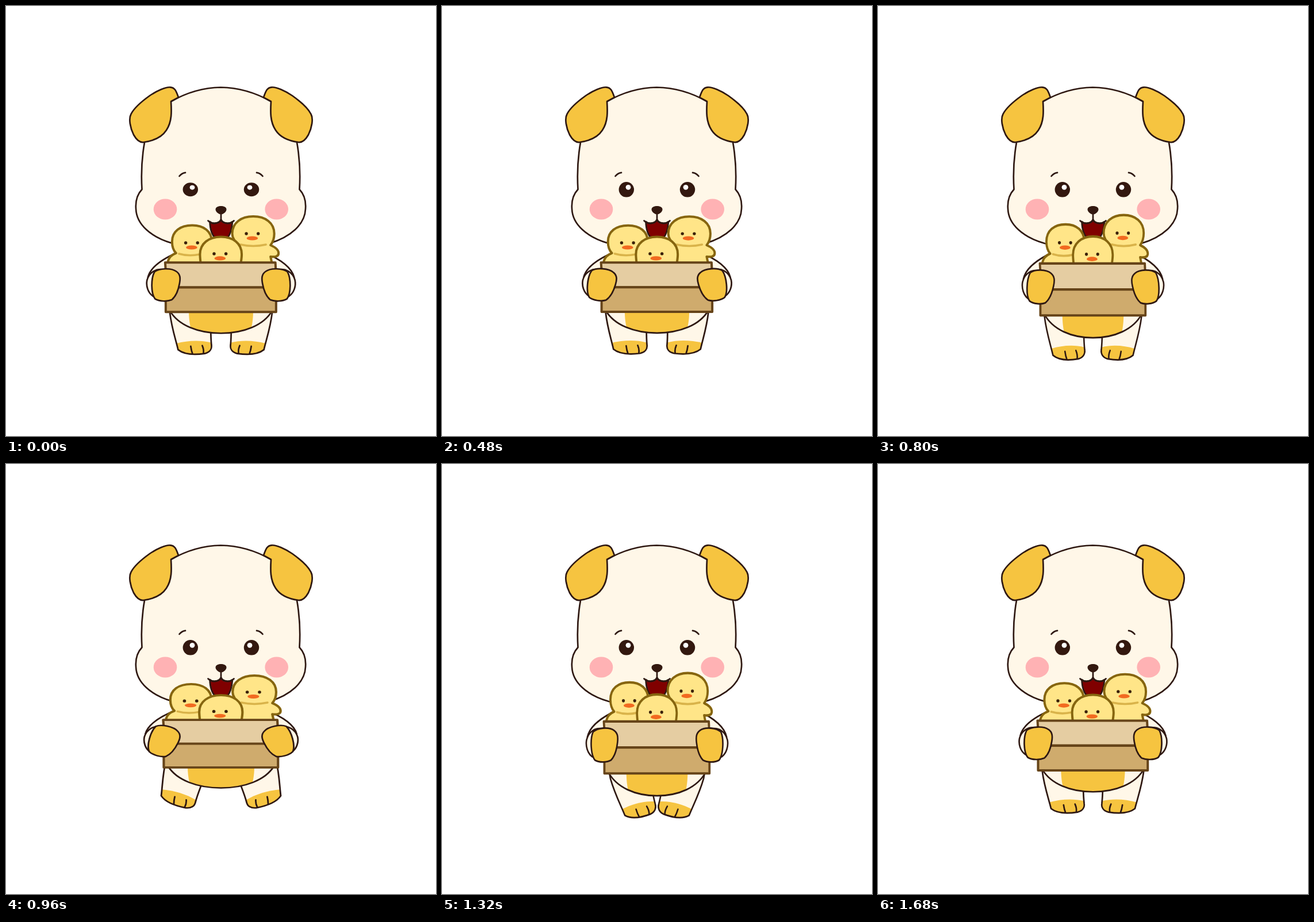
Animation of 748 by 748 pixels, one loop 2 s. Source, as an HTML page:

```html
<!DOCTYPE html>
<html lang="en">
<head>
<meta charset="utf-8">
<title>Puppy with chicks</title>
<style>
  html, body { margin: 0; width: 100%; height: 100%; overflow: hidden; background: #fff; }
  svg { display: block; width: 100%; height: 100%; }
  .line { stroke: #2e1812; stroke-width: 2.7; stroke-linecap: round; stroke-linejoin: round; }
  .cream { fill: #fff7e8; }
  .gold { fill: #f6c440; }
  .none { fill: none; }
  .chick { fill: #ffe588; stroke: #86650f; stroke-width: 4; stroke-linejoin: round; }
  .fold { fill: none; stroke: #d9b34a; stroke-width: 3.6; stroke-linecap: round; }
  .dot { fill: #3a2008; }
  .beak { fill: #f26a20; }
  .crate { stroke: #664419; stroke-width: 4; stroke-linejoin: round; }
  .dark { fill: #33180f; }
  .blush { fill: #ffb2b4; }
</style>
</head>
<body>
<svg viewBox="0 0 748 748">
  <defs>
    <g id="face">
      <circle class="dot" r="2.7" cx="-10.3"/>
      <circle class="dot" r="2.7" cx="10.3"/>
      <ellipse class="beak" rx="9.8" ry="3.6" cy="8"/>
    </g>
  </defs>

  <g class="squash">
    <g id="leg">
      <g id="swing">
        <path class="cream" d="M285 515V533C288 560 295 580 299 598C310 607 330 607 345 605C354 603 358 597 357 590C356 580 356 570 356 560V515Z"/>
        <path class="gold" d="M296 587C315 582 338 581 356.5 586C358 597 354 603 345 605C330 607 310 607 299 598Z"/>
        <path class="line none" d="M285 515V533C288 560 295 580 299 598C310 607 330 607 345 605C354 603 358 597 357 590C356 580 356 570 356 560V515M321 592Q322 600 324 605M341 591Q344 598 343 604"/>
      </g>
    </g>
    <use href="#leg" transform="matrix(-1 0 0 1 748 0)"/>
    <path class="cream" d="M290 425H458V460H290Z"/>
    <path class="cream" d="M290 455L285 530C300 556 335 569.5 374 569.5S448 556 463 530L458 455Z"/>
    <path class="gold" d="M318 525C318 540 319 550 321 559C338 566 356 569.5 374 569.5S410 566 427 559C429 550 430 540 430 525Z"/>
    <path class="line none" d="M290 455L285 530C300 556 335 569.5 374 569.5S448 556 463 530L458 455"/>
    <g id="arm">
      <path class="line cream" d="M300 428C272 440 251 455 247 472L256 500H300Z"/>
      <path class="line cream" d="M300 505H256C247 499 243.500 487 245.500 477C249 464 262 454 278 460"/>
    </g>
    <use href="#arm" transform="matrix(-1 0 0 1 748 0)"/>
  </g>

  <path class="line cream" d="M373.5 141.5C340 142 310 153 287 166C262 185 248 210 241 237C236 265 235 295 236.5 319C228 328 225 340 226 353C227 380 252 402 290 413C320 420 350 422 374 422S428 420 458 413C495 402 520 380 521 353C522 340 519 328 510.5 319C512 295 511 265 506 237C499 210 485 185 461 166C438 153 407 142 373.5 141.5Z"/>
  <g id="ear">
    <path class="line gold" d="M300 159C296 148 294 142 286 141.300C278 140.500 262 148 250 156C236 166 223 177 217.500 188C213 196 216 212 222 224C227 233 232 237.500 239 237C254 235 270 230 279 216C289 201 288 183 287 166Z"/>
  </g>
  <use href="#ear" transform="matrix(-1 0 0 1 748 0)"/>
  <ellipse class="blush" cx="277" cy="353.5" rx="20.3" ry="18"/>
  <ellipse class="blush" cx="470.7" cy="353.5" rx="20.3" ry="18"/>
  <path class="line none" d="M301.5 296Q306 290.5 312 289.8M436 289.8Q442 290.5 446.5 296"/>
  <g id="eyes">
    <circle class="dark" cx="320.8" r="13.2"/>
    <circle class="dark" cx="427" r="13.2"/>
    <circle fill="#fff" cx="324" cy="-4" r="4.4"/>
    <circle fill="#fff" cx="424" cy="-4" r="4.4"/>
  </g>
  <path fill="#800000" class="line" d="M354.5 375C355 389 359 399 364 404H385C390 398 393 388 394 375C389 380 377 379 374 372C371 379 359 380 354.5 375Z"/>
  <path class="line none" d="M351.5 373.5C358 380 371 379 374 371C377 379 390 380 396.5 373.5M374 361V371"/>
  <path class="dark" d="M374 348C380 348 383.5 350.5 383.5 354C383.5 358 378 362.5 374 362.5S364.5 358 364.5 354C364.5 350.5 368 348 374 348Z"/>

  <g class="squash">
    <path class="chick" d="M400 450C409 440 410 425 405 416C397 409 393.500 403 393.500 396C393.500 377 409 366 430 366S466.500 377 466.500 396C466.500 404 465 410 460 416C467 419 474 424 474 430C474 436 468 437 460 436L463 450Z"/>
    <path class="fold" d="M408 415Q430 420 452 415"/>
    <use href="#face" x="428.3" y="396"/>
    <path class="chick" d="M281 448C283 437 288 433 296 430C290 424 289 417 289 410C289 392 303 381.5 324 381.5C344 381.5 358 392 358 410V450Z"/>
    <path class="fold" d="M301 431Q318 436 337 432"/>
    <use href="#face" x="323" y="412"/>
    <path class="chick" d="M339 450C338 442 337.5 437 337.5 432C337.5 413 353 401.5 374 401.5S410 413 410 432C410 438 409 443 408 450Z"/>
    <use href="#face" x="372.3" y="431"/>
    <path class="crate" fill="#e5cda2" d="M277 446.300H468.500L470.500 489.500H280Z"/>
    <path class="crate" fill="#cfab6d" d="M278 489.500H469.700V532.500H278Z"/>
    <g id="hand">
      <path id="paw" class="line gold" d="M258 463C266 456.500 287 455 296 461.500C303 466 303.500 473 302 482C300 495 296 505 289 511C281 514.500 268 514.500 260 510C252.500 501 252 475 258 463Z"/>
    </g>
    <use href="#hand" transform="matrix(-1 0 0 1 748 0)"/>
  </g>
</svg>
<script>
  const LOOP = 2000, STEP = 40, REST = 1680;
  // time, stretch, leg angle, hand angle
  const poses = [
    [-60, 0.005, -1.2, 0],
    [300, -0.094, 12, 16],
    [680, 0.101, -13.5, -3],
    [970, -0.04, 19.5, 16],
    [1340, 0.05, -11.5, -2],
    [REST, 0.005, -1.2, 0]
  ];
  const squash = document.querySelectorAll('.squash');
  const swing = document.getElementById('swing');
  const paw = document.getElementById('paw');
  const eyes = document.getElementById('eyes');

  function poseAt(t) {
    let i = 1;
    while (i < poses.length - 1 && t > poses[i][0]) i++;
    const a = poses[i - 1], b = poses[i];
    const u = (1 - Math.cos(Math.PI * (t - a[0]) / (b[0] - a[0]))) / 2;
    return [1, 2, 3].map(n => a[n] + (b[n] - a[n]) * u);
  }

  function lidAt(t) {
    return t < 360 ? 1 - Math.sin(Math.PI * (t + 40) / 400) ** 2 : 1;
  }

  function draw(ms) {
    const t = Math.min(REST, Math.floor((ms % LOOP) / STEP) * STEP);
    const [k, leg, hand] = poseAt(t);
    const form = `translate(374 416) scale(${1 - 0.94 * k} ${1 + k}) translate(-374 -416)`;
    squash.forEach(g => g.setAttribute('transform', form));
    swing.setAttribute('transform', `rotate(${leg} 328 517)`);
    paw.setAttribute('transform', `rotate(${hand} 279 484)`);
    eyes.setAttribute('transform', `translate(0 319.3) scale(1 ${lidAt(t)})`);
  }

  let start;
  function tick(now) {
    if (start === undefined) start = now;
    draw(now - start);
    requestAnimationFrame(tick);
  }
  draw(0);
  requestAnimationFrame(tick);
</script>
</body>
</html>
```
